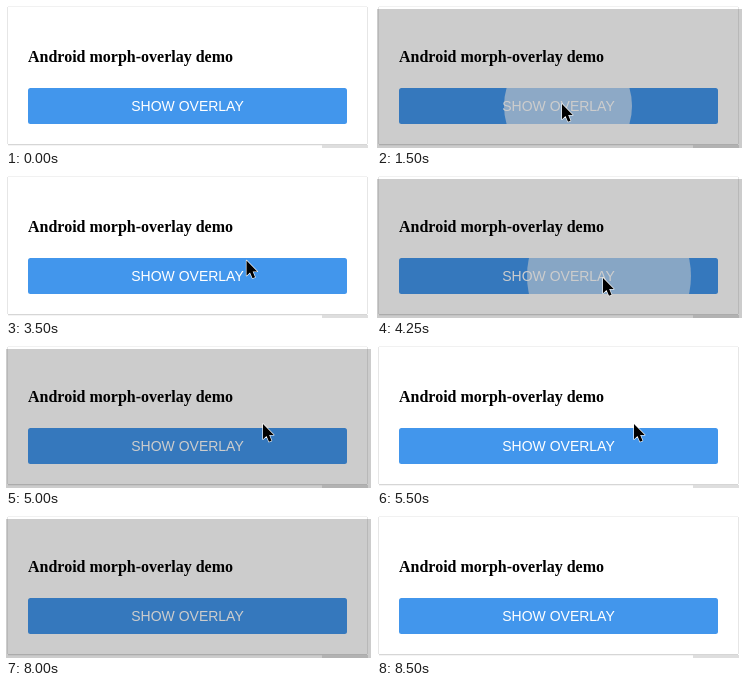
An HTML page that plays this animation: 365x142 px, repeating every 9.75 s.

```html
<!DOCTYPE html>
<html lang="en">
<head>
<meta charset="utf-8">
<title>Overlay demo</title>
<style>
  html, body { margin: 0; width: 100%; height: 100%; overflow: hidden; background: #fff; }
  svg { display: block; width: 365px; height: 142px; }
  .title { font: bold 16px "Liberation Serif", Times, serif; }
  .label { font: 14px "Liberation Sans", Arial, sans-serif; fill: #fff; text-anchor: middle; }
</style>
</head>
<body>
<svg viewBox="0 0 365 142">
  <defs>
    <clipPath id="buttonShape"><rect x="22" y="82" width="319" height="36" rx="2.5"/></clipPath>
  </defs>
  <rect width="365" height="142" fill="#fff"/>
  <path d="M2 .5H361" stroke="#f1f1f1"/>
  <path d="M1.5 1V138M361.5 1V138" stroke="#e6e6e6"/>
  <path d="M2 138.5H361" stroke="#d6d6d6"/>
  <path d="M2 139.5H316" stroke="#f4f4f4"/>
  <rect x="316" y="139" width="46" height="3" fill="#dedede"/>
  <text class="title" x="22" y="56">Android morph-overlay demo</text>
  <g clip-path="url(#buttonShape)">
    <rect x="22" y="82" width="319" height="36" fill="#4296ec"/>
    <circle id="ripple" cy="100" fill="#fff"/>
  </g>
  <text class="label" x="181.5" y="105">SHOW OVERLAY</text>
  <rect id="backdrop" y="3" width="365" height="139" opacity=".2"/>
  <path id="cursor" d="M0 0V15.2L3.5 12L6 17.8L8.6 16.7L6.2 11H10.8Z"
        fill="#000" stroke="#fff" stroke-width="1.2" stroke-linejoin="round" paint-order="stroke"/>
</svg>
<script>
const LOOP = 9750, STEP = 250;

// Each press opens the backdrop and starts a ripple at x with the given radius.
const presses = [
  { open: 1500, close: 3000, x: 191, radius: 64 },
  { open: 4250, close: 5500, x: 232, radius: 82 },
  { open: 6750, close: 8500, x: 258, radius: 75 }
];

// Pointer moves: start time, end time, from, to.
const moves = [
  [250, 750, [186, 91], [185, 98]],
  [2000, 2500, [185, 98], [255, 67]],
  [3250, 3750, [255, 67], [226, 102]],
  [4500, 5000, [226, 102], [257, 78]],
  [6250, 6500, [257, 78], [254, 97]],
  [7000, 7250, [254, 97], [258, 1]]
];
const POINTER_IN = 250, POINTER_OUT = 7500;

const [ripple, backdrop, cursor] =
  ["ripple", "backdrop", "cursor"].map(id => document.getElementById(id));

const show = (node, visible) => node.setAttribute("visibility", visible ? "visible" : "hidden");

function pointerAt(t) {
  const [start, end, from, to] = moves.filter(move => move[0] <= t).pop();
  const p = Math.min(1, (t - start) / (end - start));
  return from.map((v, i) => v + (to[i] - v) * p);
}

function draw(time) {
  const t = Math.floor((time % LOOP) / STEP) * STEP;
  const press = presses.find(p => t >= p.open && t < p.close);
  show(backdrop, press);

  const radius = press ? press.radius + 0.44 * (t - press.open) : 0;
  const opacity = 0.73 - 0.0023 * radius;
  const rippling = press && opacity > 0.05;
  show(ripple, rippling);
  if (rippling) {
    ripple.setAttribute("cx", press.x);
    ripple.setAttribute("r", radius);
    ripple.setAttribute("opacity", opacity);
  }

  const hasPointer = t >= POINTER_IN && t < POINTER_OUT;
  show(cursor, hasPointer);
  if (hasPointer) cursor.setAttribute("transform", `translate(${pointerAt(t)})`);
}

const began = performance.now();
function frame() {
  draw(performance.now() - began);
  requestAnimationFrame(frame);
}
frame();
</script>
</body>
</html>
```
